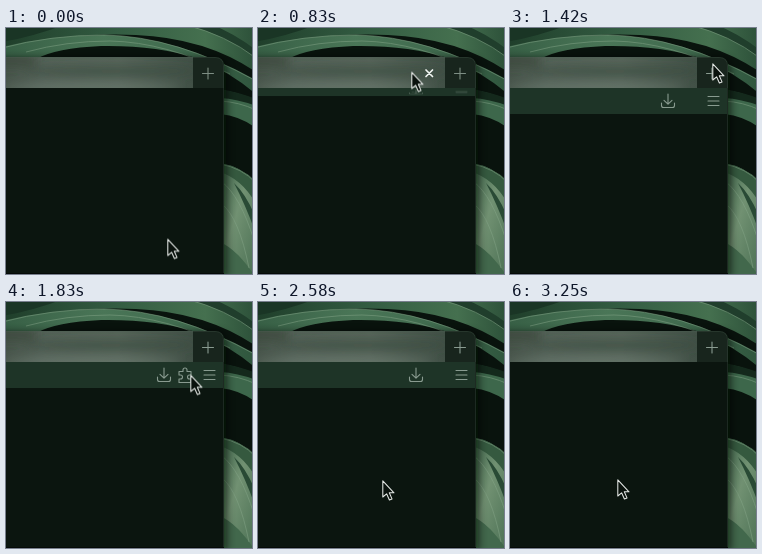
Write an HTML page that moves like this. It is 246 px wide and 246 px high and loops after 4000 ms.

```html
<!DOCTYPE html>
<html lang="en">
<head>
<meta charset="utf-8">
<title>Auto-hiding toolbar</title>
<style>
html, body { margin: 0; width: 100%; height: 100%; overflow: hidden; background: #0b140e; }
svg { display: block; width: 100vw; height: 100vh; }
.icon { fill: none; stroke: #899b90; stroke-width: 1.1; stroke-linecap: round; stroke-linejoin: round; }

#bar, #close, #puzzle, #plus, #cursor { animation: 4s step-end infinite; }
#bar { animation-name: bar; transform-origin: 0 60px; }
#close { animation-name: close; }
#puzzle { animation-name: puzzle; }
#plus { animation-name: plus; }
#cursor { animation-name: cursor; }
#tools { animation: tools 4s step-end infinite; }

@keyframes bar {
  0%, 81.25%, 100% { transform: scaleY(0); }
  18.75%, 77% { transform: scaleY(.08); }
  20.75% { transform: scaleY(.31); }
  23%, 73% { transform: scaleY(.8); }
  25% { transform: scaleY(1); }
  75% { transform: scaleY(.35); }
}
@keyframes tools {
  0%, 77%, 100% { opacity: 0; }
  20.75%, 75% { opacity: .5; }
  23%, 73% { opacity: .8; }
  25% { opacity: 1; }
}
@keyframes close {
  0%, 31.25%, 100% { opacity: 0; }
  16.75% { opacity: 1; }
}
@keyframes puzzle {
  0%, 56.25%, 100% { opacity: 0; }
  37.5%, 54.25% { opacity: .5; }
  39.5% { opacity: 1; }
}
@keyframes plus {
  0%, 100% { opacity: .9; }
  31.25% { opacity: 1; }
}
@keyframes cursor {
  0%, 100% { transform: translate(161px, 210.5px); }
  2% { transform: translate(164.5px, 201px); }
  6.25% { transform: translate(169.5px, 160px); }
  8.25% { transform: translate(174px, 113.5px); }
  12.5% { transform: translate(171.5px, 90px); }
  14.5% { transform: translate(165px, 65.5px); }
  16.75% { transform: translate(158px, 50px); }
  18.75% { transform: translate(154px, 42px); }
  20.75% { transform: translate(153px, 43.5px); }
  27% { transform: translate(161px, 53px); }
  29.25% { transform: translate(176px, 66px); }
  31.25% { transform: translate(200px, 62px); }
  33.25% { transform: translate(210px, 45px); }
  35.5% { transform: translate(202px, 35px); }
  37.5% { transform: translate(189px, 54px); }
  39.5% { transform: translate(184px, 71.5px); }
  41.75% { transform: translate(184px, 72.5px); }
  52% { transform: translate(189px, 79px); }
  54.25% { transform: translate(192px, 94px); }
  56.25% { transform: translate(185px, 119px); }
  58.25% { transform: translate(166px, 146px); }
  60.5% { transform: translate(145px, 166px); }
  62.5% { transform: translate(131px, 175px); }
  64.5% { transform: translate(124px, 178px); }
  66.75% { transform: translate(113.5px, 177px); }
  68.75% { transform: translate(107px, 177px); }
}
</style>
</head>
<body>
<svg viewBox="0 0 246 246" preserveAspectRatio="none">
  <defs>
    <linearGradient id="leafA">
      <stop offset="0" stop-color="#1f3e2a"/><stop offset=".45" stop-color="#335c42"/>
      <stop offset=".8" stop-color="#45704f"/><stop offset="1" stop-color="#2c5039"/>
    </linearGradient>
    <linearGradient id="leafB">
      <stop offset="0" stop-color="#375f45"/><stop offset=".4" stop-color="#4a7657"/>
      <stop offset=".75" stop-color="#3f694d"/><stop offset="1" stop-color="#2f553d"/>
    </linearGradient>
    <linearGradient id="leafC" x1="0" y1="0" x2="1" y2="1">
      <stop offset="0" stop-color="#3b6248"/><stop offset=".45" stop-color="#719172"/><stop offset="1" stop-color="#4a6f53"/>
    </linearGradient>
    <linearGradient id="tab">
      <stop offset="0" stop-color="#47544a"/><stop offset=".2" stop-color="#536157"/>
      <stop offset=".6" stop-color="#566459"/><stop offset="1" stop-color="#415046"/>
    </linearGradient>
    <filter id="soft" x="-20%" y="-20%" width="140%" height="140%"><feGaussianBlur stdDeviation="5"/></filter>
    <filter id="blend"><feGaussianBlur stdDeviation=".7"/></filter>
    <clipPath id="frame"><path d="M0 29H209Q218 29 218 38V246H0Z"/></clipPath>
    <clipPath id="tabBox"><rect y="29" width="187" height="31"/></clipPath>
  </defs>

  <!-- foliage -->
  <rect width="246" height="246" fill="#09130d"/>
  <g filter="url(#blend)">
    <path d="M-4-4H250V44Q200 10 130 7Q60 4 -4 22Z" fill="url(#leafA)"/>
    <path d="M-4-4H60Q30 8 -4 14Z" fill="#1a3525"/>
    <path d="M-4 19Q45 7 98 7Q170 8 250 52V66Q224 44 190 30Q150 17 95 18Q50 20 30 31H-4Z" fill="url(#leafB)"/>
    <path d="M178-4Q220 7 250 30V22Q226 4 204-4Z" fill="#203e2c"/>
    <path d="M214 62Q232 64 250 72V100Q234 88 214 86Z" fill="#3d674b"/>
    <path d="M214 61Q232 64 250 71V78Q232 71 214 70Z" fill="#14291c"/>
    <path d="M214 135Q236 139 250 154V250H214Z" fill="url(#leafC)"/>
    <path d="M214 135Q236 139 250 154V176Q236 151 214 144Z" fill="#35593f"/>
    <path d="M228 155Q240 166 250 190V206Q240 178 228 155Z" fill="#294a35"/>
    <path d="M214 214Q232 222 250 250H214Z" fill="#42684c"/>
    <g fill="none" stroke="#86a68a" stroke-width=".9" opacity=".55">
      <path d="M-4 20Q45 7 98 7Q170 8 250 53M20 24Q60 13 104 13Q160 14 224 46M180-3Q220 7 250 30"/>
      <path d="M214 73Q233 74 250 82M214 136Q236 140 250 155"/>
      <path d="M216 154Q234 168 248 212M216 176Q233 190 243 240"/>
    </g>
  </g>

  <!-- window -->
  <path d="M-10 31H212Q220 31 220 40V250H-10Z" fill="#030805" opacity=".75" filter="url(#soft)"/>
  <g clip-path="url(#frame)">
    <rect y="29" width="218" height="217" fill="#0b150f"/>
    <rect y="29" width="218" height="31" fill="#18251d"/>
    <g clip-path="url(#tabBox)">
      <rect y="29" width="187" height="31" fill="url(#tab)"/>
      <g filter="url(#soft)">
        <ellipse cx="105" cy="43" rx="88" ry="5" fill="#38483d" opacity=".55"/>
        <rect x="-10" y="27" width="40" height="12" fill="#36433a" opacity=".6"/>
        <ellipse cx="85" cy="60" rx="90" ry="4" fill="#75857a" opacity=".6"/>
      </g>
    </g>
    <path d="M0 29.5H210Q217.5 30 217.5 38V246" fill="none" stroke="#4b5d52" stroke-opacity=".3"/>
    <rect y="245" width="218" height="1" fill="#050a07"/>
    <g id="bar">
      <rect y="60" width="217" height="26" fill="#1e3427"/>
      <g id="tools" class="icon">
        <path d="M158 66V76M154 72.3L158 76.2L162 72.3M151.5 75V77.5Q151.5 79.5 153.5 79.5H162.5Q164.5 79.5 164.5 77.5V75"/>
        <path d="M198 68.5H209M198 73H209M198 77.5H209"/>
      </g>
    </g>
    <path id="puzzle" class="icon" d="M173 69.5H177V68A2 2 0 0 1 181 68V69.5H185V73H183.5A2 2 0 0 0 183.5 77H185V80.5H173V77H174.5A2 2 0 0 0 174.5 73H173Z"/>
    <path id="plus" class="icon" d="M196.5 45.5H207.5M202 40V51"/>
    <path id="close" d="M168 42L174.5 48.5M174.5 42L168 48.5" stroke="#f0f4f1" stroke-width="1.7" stroke-linecap="round"/>
  </g>

  <path id="cursor" d="M.8.8V17L4.6 13.8L7.4 20L10 18.9L7.3 12.8H12Z" fill="#0a120d" stroke="#e4e8e5" stroke-width="1.05" stroke-linejoin="round"/>
</svg>
</body>
</html>
```
